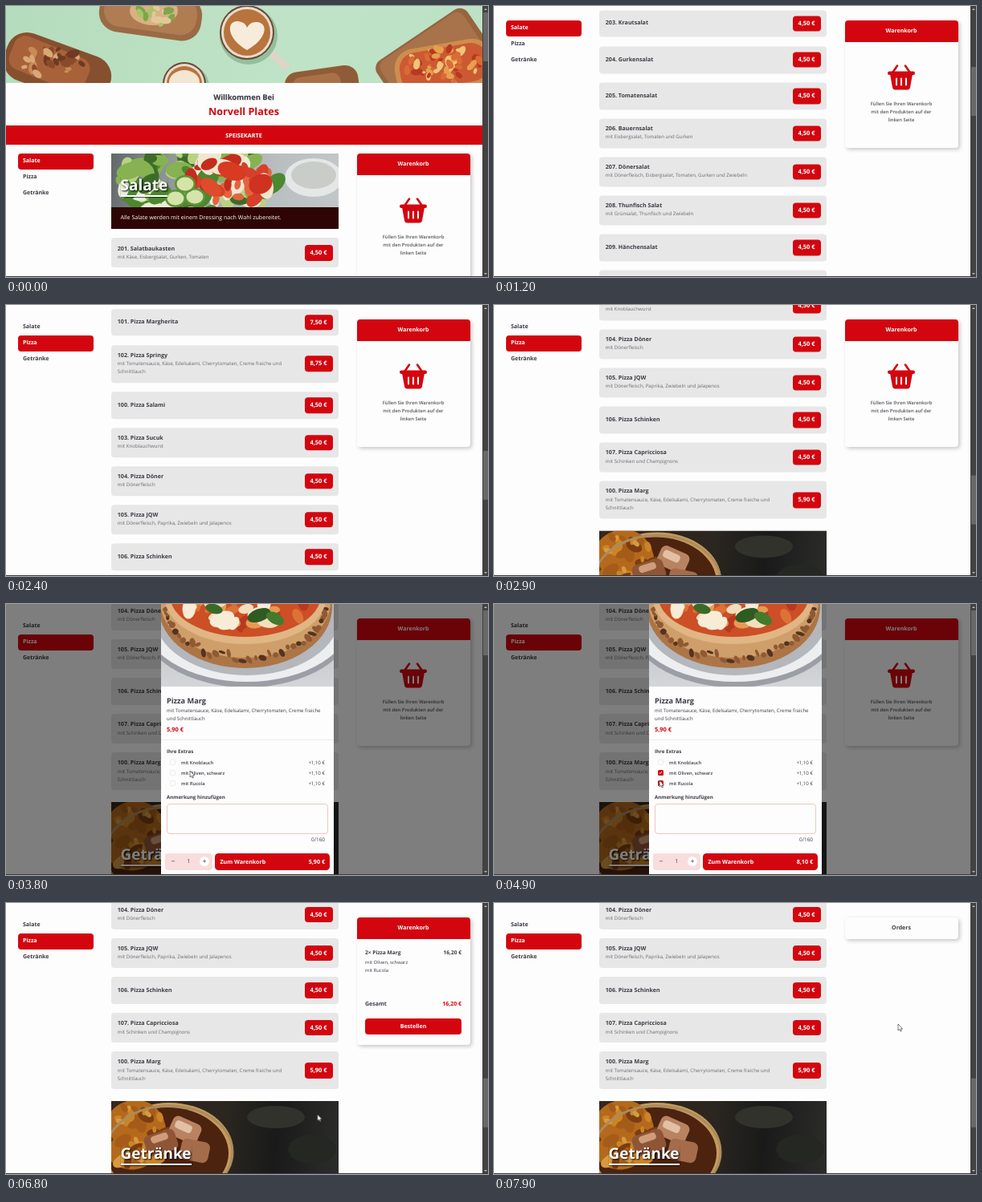
Animation, 600 px wide and 338 px high, one loop 8000 ms. Source, as an HTML page:

```html
<!DOCTYPE html>
<html lang="de">
<head>
<meta charset="utf-8">
<title>Speisekarte</title>
<style>
@property --t { syntax: '<number>'; inherits: true; initial-value: 0; }
@property --s { syntax: '<number>'; inherits: true; initial-value: 0; }

:root { --red: #d3060f; --ink: #3c3c46; }
html, body { margin: 0; width: 100%; height: 100%; overflow: hidden; background: #fdfdfd; }
* { box-sizing: border-box; }

/* --t counts ticks of 100 ms, --s is the scroll offset */
#stage {
  position: absolute; inset: 0 auto auto 0; width: 600px; height: 338px; overflow: hidden;
  background: #fdfdfd; color: var(--ink);
  font-family: "Open Sans", "Noto Sans", sans-serif; text-rendering: geometricPrecision;
  animation: tick 8s steps(80) -20ms infinite, scroll 8s -20ms infinite;
}
@keyframes tick { from { --t: 0; } to { --t: 80; } }
@keyframes scroll {
  0% { --s: 0; animation-timing-function: steps(3); }
  3.75% { --s: 30; animation-timing-function: steps(5); }
  10% { --s: 190; animation-timing-function: steps(4); }
  15% { --s: 377.6; animation-timing-function: steps(7); }
  23.75% { --s: 795.1; animation-timing-function: steps(10); }
  36.25% { --s: 1136.6; animation-timing-function: steps(3); }
  40%, 100% { --s: 1171; }
}
/* visible from tick --a until tick --b */
.at {
  --a: 0; --b: 80;
  opacity: min(clamp(0, var(--t) - var(--a) + 1, 1), clamp(0, var(--b) - var(--t), 1));
}

.abs, .l { position: absolute; }
.l { line-height: 10px; white-space: nowrap; }
.c { transform: translateX(-50%); }
.r { transform: translateX(-100%); }
.b { font-weight: 700; }
.red { color: var(--red); }
.white { color: #fff; }
.pic { position: absolute; left: 0; top: 0; display: block; overflow: hidden; }
.pic g { filter: blur(.6px); }

#page { position: absolute; left: 0; top: 0; width: 593px; transform: translateY(calc(var(--s) * -1px)); }
.bar { left: 0; top: 149.4px; width: 593px; height: 23.8px; background: var(--red); }
#menu { position: absolute; top: 169px; left: 131px; width: 283px; display: flow-root; }

.banner { position: relative; height: 94px; margin: 15px 0 11.4px; overflow: hidden; }
.banner h2 {
  position: absolute; left: 11.5px; top: 28.6px; margin: 0; padding-bottom: 3px;
  font-size: 19px; line-height: 20px; color: #fff; border-bottom: 2px solid #fff;
  text-shadow: 1px 1px 2px #000; box-shadow: 0 1px 1px rgba(0, 0, 0, .6);
}
.banner.plain h2 { top: 54.6px; }
.banner p {
  position: absolute; left: 0; right: 0; top: 67px; height: 27px; margin: 0; padding-left: 11.5px;
  font-size: 7.1px; line-height: 27.6px; color: #fff; background: #2e0404;
}
.item {
  display: flex; align-items: center; justify-content: space-between;
  min-height: 33.9px; margin-bottom: 11.25px; padding: 7.2px 7.5px 7.2px 7.8px;
  border-radius: 4px; background: #e7e7e7;
}
.item div { margin: .95px 0; }
.item b { display: block; font-size: 7.1px; line-height: 10.2px; }
.item p { margin: 0; font-size: 6.1px; line-height: 10.3px; color: #6b6b70; white-space: pre; }
.price {
  width: 35px; height: 19.5px; border-radius: 4px; background: var(--red); color: #fff;
  font: 700 7.5px/20px "Open Sans", "Noto Sans", sans-serif; text-align: center;
}

#nav, #cart { position: absolute; top: max(18.4px, 184.4px - var(--s) * 1px); }
#nav { left: 15px; font-size: 7px; font-weight: 700; }
#nav div { position: absolute; width: 94px; height: 19.6px; padding-left: 6px; line-height: 20.6px; border-radius: 4px; }
#nav .at { background: var(--red); color: #fff; }
#cart { left: 437px; }
.card { position: absolute; width: 140.5px; height: 158.2px; border-radius: 4px; background: #fdfdfd; box-shadow: 2px 2px 5px rgba(0, 0, 0, .22); }
.card .head { height: 26.7px; border-radius: 4px 4px 0 0; background: var(--red); }
.card svg { position: absolute; left: 53px; top: 55px; }
.order { left: 10px; top: 126px; width: 120px; height: 20px; border-radius: 4px; background: var(--red); }

#modal { position: absolute; inset: 0; opacity: min(clamp(0, (var(--t) - 33) / 3, 1), clamp(0, (67 - var(--t)) / 3, 1)); }
.shade { inset: 0 7px 0 0; background: rgba(0, 0, 0, .5); }
.sheet { left: 193px; top: 0; width: 215px; height: 338px; overflow: hidden; background: #fdfdfd; }
.line { left: 193px; top: 169px; width: 215px; height: 1px; background: #ececec; }
.note { left: 200px; top: 249px; width: 201px; height: 37.5px; border: 1px solid #f0c6bf; border-radius: 4px; }
.count { left: 198px; top: 311px; width: 59px; height: 20.5px; border-radius: 4px; background: #f9dcdc; }
.dot { width: 12px; height: 12px; border-radius: 50%; background: #fff; }
.buy { left: 260px; top: 311px; width: 143px; height: 20.5px; border-radius: 4.5px; background: var(--red); }
.box { left: 204px; width: 6.6px; height: 6.6px; border: .6px solid #f3e9e9; border-radius: 1.5px; }
.tick { border: 0; background: var(--red); }
.tick svg { display: block; }

#track { left: 592.5px; top: 0; width: 7.5px; height: 338px; background: #424242; }
.thumb { left: 1px; top: 8px; width: 6px; background: #686868; }
.arrow { left: 2px; border: solid transparent; border-width: 0 2px; }
.up { top: 3px; border-bottom: 2.5px solid #bbb; }
.down { bottom: 3px; border-top: 2.5px solid #bbb; }
.edge { left: 0; bottom: 0; width: 600px; height: 1px; background: #3a3a3a; }

#cursor { position: absolute; left: 0; top: 0; animation: point 8s -20ms infinite; }
#cursor svg { position: absolute; left: 0; top: 0; overflow: visible; }
@keyframes point {
  0%, 42.5% { transform: translate(240px, 250px); animation-timing-function: steps(3); }
  46.25%, 52.5% { transform: translate(229px, 208px); animation-timing-function: steps(4); }
  57.5%, 63.75% { transform: translate(206px, 220px); animation-timing-function: steps(5); }
  70%, 77.5% { transform: translate(247px, 320px); animation-timing-function: steps(2); }
  80%, 82.5% { transform: translate(330px, 320px); animation-timing-function: steps(6); }
  90%, 100% { transform: translate(503px, 151px); }
}
</style>
</head>
<body>
<div id="stage">
  <div id="page"></div>
  <div id="nav"></div>
  <div id="cart"></div>
  <div id="modal"></div>
  <div id="track" class="abs">
    <i class="abs arrow up"></i><i class="abs arrow down"></i>
    <i class="abs at" style="--b:35"><i class="abs thumb" style="height:61px;transform:translateY(calc(var(--s) * .18px))"></i></i>
    <i class="abs at" style="--a:35;--b:66"><i class="abs thumb" style="height:56px"></i></i>
    <i class="abs at" style="--a:66"><i class="abs thumb" style="height:61px;transform:translateY(calc(var(--s) * .18px))"></i></i>
  </div>
  <div class="abs edge"></div>
  <div class="at" style="--a:34">
    <div id="cursor">
      <div class="at" style="--a:34;--b:56"><svg width="6" height="10"><use href="#ptr"/></svg></div>
      <div class="at" style="--a:56;--b:66"><svg width="8" height="12"><path d="M-.6 1q.8-1 1.6 0v4l3.2.8q1 .3.8 1.5l-.7 4.2h-4.3l-2.800-4q0-1.400 2.200 0z" fill="#fff" stroke="#222" stroke-width=".7"/></svg></div>
      <div class="at" style="--a:66"><svg width="6" height="10"><path id="ptr" d="M0 0v8l1.900-1.600 1.200 2.700 1.300-.6-1.200-2.500h2.400z" fill="#fff" stroke="#222" stroke-width=".6"/></svg></div>
    </div>
  </div>
</div>

<script>
const $ = id => document.getElementById(id);
const label = (x, y, size, text, cls = '', style = '') =>
  `<span class="l ${cls}" style="left:${x}px;top:${y - 4.8}px;font-size:${size}px;${style}">${text}</span>`;
const during = (a, b, html) => `<div class="at" style="--a:${a};--b:${b}">${html}</div>`;

// soft pictures built from ellipses
let seed = 7;
const rnd = () => (seed = seed * 16807 % 2147483647) / 2147483647;
const oval = (x, y, rx, ry, fill, rot = 0) =>
  `<ellipse cx="${x}" cy="${y}" rx="${rx}" ry="${ry}" fill="${fill}" transform="rotate(${rot} ${x} ${y})"/>`;
const slab = (x, y, w, h, r, fill, rot = 0) =>
  `<rect x="${x - w / 2}" y="${y - h / 2}" width="${w}" height="${h}" rx="${r}" fill="${fill}" transform="rotate(${rot} ${x} ${y})"/>`;
const scatter = (n, x, y, rx, ry, size, fills) => Array.from({ length: n }, (_, i) => {
  const a = rnd() * 6.283, d = Math.sqrt(rnd()), s = size * (.5 + rnd());
  return oval(x + rx * d * Math.cos(a), y + ry * d * Math.sin(a), s, s * .6, fills[i % fills.length], rnd() * 180);
}).join('');
const pic = (w, h, bg, art) =>
  `<svg class="pic" width="${w}" height="${h}" style="background:${bg}"><g>${art}</g></svg>`;

const cup = (x, y, r) => oval(x + 2, y + 4, r + 2, r + 2, '#93bf9f') + oval(x, y, r, r, '#6b4a33')
  + oval(x, y, r - 2, r - 2, '#e6dccf') + oval(x, y, r - 5, r - 5, '#b8743c');

const hero = pic(593, 96, 'linear-gradient(100deg,#b5dcbd,#bfe3c6 60%,#bde1c4)',
  slab(64, 78, 136, 62, 26, '#86502f', 20) + slab(54, 72, 100, 44, 14, '#a8623a', 22)
  + scatter(30, 54, 72, 42, 20, 6, ['#6e3a22', '#c98a55', '#8a4a2c', '#d9a878'])
  + slab(180, 10, 128, 56, 24, '#9a6a45', 8) + slab(180, 8, 116, 46, 20, '#b07c52', 8)
  + oval(184, 6, 30, 18, '#d9b183') + scatter(18, 184, 12, 26, 10, 5, ['#7fa64a', '#a9c468', '#e3c79a'])
  + slab(338, 66, 36, 9, 4, '#dfd5c6', 42) + cup(300, 33, 34)
  + '<path d="M300 55C274 40 274 18 289 19q9 1 11 8 4-8 13-7c14 2 12 21-13 35z" fill="#f7ecdc"/>'
  + cup(222, 97, 27) + oval(222, 95, 19, 15, '#f3e6d2')
  + slab(394, 104, 92, 52, 16, '#8f5c37', -8) + slab(388, 106, 60, 40, 10, '#a97146', -8)
  + slab(532, 66, 136, 72, 12, '#976440', -34) + slab(530, 64, 124, 62, 10, '#a8724a', -34)
  + slab(545, 76, 122, 58, 24, '#cf8d4d', -10) + slab(545, 76, 110, 48, 20, '#cb5a33', -10)
  + scatter(60, 545, 76, 52, 23, 5, ['#e6a04e', '#b9381f', '#efc476', '#da6b36']));

const salad = pic(283, 94, 'linear-gradient(100deg,#62686a,#8f9698 25%,#b9bfc0 70%,#c3c7c9)',
  oval(252, 30, 36, 24, '#e4e7e6') + oval(252, 27, 28, 17, '#c9cdca')
  + scatter(90, 112, 34, 100, 46, 12, ['#4d8730', '#86b251', '#3c6d28', '#b9d184', '#e9efd8'])
  + scatter(34, 142, 34, 56, 30, 12, ['#d6402a', '#e4633f', '#c42d1c', '#f0e6d0'])
  + oval(150, 22, 18, 11, '#d83a22', 20) + oval(186, 38, 15, 12, '#cf3220', -25) + oval(124, 42, 15, 9, '#de4c2b', 40)
  + [[80, 56], [104, 54], [92, 38]].map(([x, y]) => oval(x, y, 13, 11, '#5d9439') + oval(x, y, 10.5, 8.5, '#d5e4a8')).join(''));

const sandwich = pic(283, 94, 'linear-gradient(95deg,#a5642c,#cf9347 25%,#b9752f 70%,#dba057)',
  oval(114, 34, 100, 38, '#d9a263', 4) + oval(100, 14, 86, 24, '#ecc68c', 5)
  + scatter(46, 116, 20, 80, 13, 10, ['#7a4523', '#b97b43', '#5f3219', '#d6a067'])
  + scatter(40, 132, 58, 92, 12, 11, ['#3d8a2a', '#79b843', '#a8cf63'])
  + scatter(22, 116, 42, 72, 8, 9, ['#d3281a', '#b51d13', '#e5562f'])
  + oval(120, 76, 104, 12, '#e3b678'));

const drink = pic(283, 94, 'linear-gradient(95deg,#38261a,#2a2620 50%,#191a19 72%,#2c2d2b)',
  oval(205, 20, 36, 14, '#32322c') + oval(250, 60, 30, 18, '#252723')
  + oval(72, 62, 80, 60, '#c79a5a') + oval(70, 65, 76, 57, '#4b230f') + oval(28, 42, 40, 44, '#b5691c', 20)
  + scatter(50, 30, 44, 42, 40, 8, ['#cc8426', '#a55c18', '#7a3d12', '#d79a40'])
  + slab(92, 36, 38, 26, 7, '#b98362', 24) + slab(62, 52, 40, 27, 7, '#8f5537', -18) + slab(104, 62, 36, 26, 7, '#a46c4b', 12)
  + slab(90, 32, 22, 10, 4, '#e2c0a4', 24) + slab(60, 46, 22, 9, 4, '#cf9d7b', -18)
  + '<ellipse cx="72" cy="64" rx="79" ry="58" fill="none" stroke="#a98c60" stroke-width="3"/>');

const chars = Array.from({ length: 36 }, (_, i) => {
  const a = .08 + i * .085;
  return oval(105 + 100 * Math.cos(a), 1 + (60 + rnd() * 12) * Math.sin(a), 2 + rnd() * 4, 1.5 + rnd() * 2.5, i % 3 ? '#8f5a33' : '#54331f', rnd() * 90);
}).join('');
const pizza = pic(215, 103, 'linear-gradient(#b9bcc1,#c9ccd0 60%,#d3d5d8)',
  oval(107, 20, 134, 84, '#9b9fa5') + oval(107, 15, 132, 82, '#eceef0') + oval(107, 13, 116, 76, '#b4b7bc')
  + oval(105, 4, 108, 76, '#ad7546') + oval(105, -3, 106, 70, '#cf9f6b') + chars
  + oval(105, -7, 100, 57, '#e0b684') + oval(105, -11, 94, 52, '#cc4f26')
  + scatter(40, 105, -8, 82, 42, 9, ['#dd7236', '#b9391f', '#e69a54'])
  + scatter(14, 100, 2, 72, 26, 11, ['#f3dfbc', '#f8ecd6'])
  + oval(122, 14, 15, 8, '#2f5a22', -20) + oval(142, 18, 12, 7, '#447a2d', 30) + oval(66, 6, 11, 6, '#3b6a28', 15));

// menu
const banner = (title, art, text) =>
  `<div class="banner ${text ? '' : 'plain'}">${art}<h2>${title}</h2>${text ? `<p>${text}</p>` : ''}</div>`;
const item = row => {
  const [title, price, desc] = row.split('|');
  return `<div class="item"><div><b>${title}</b>${desc ? `<p>${desc}</p>` : ''}</div><span class="price">${price || '4,50'} €</span></div>`;
};
const creme = 'mit Tomatensauce, Käse, Edelsalami, Cherrytomaten, Creme fraiche';
const salads = [
  '201. Salatbaukasten||mit Käse, Eisbergsalat, Gurken, Tomaten',
  '202. Bohnensalat', '203. Krautsalat', '204. Gurkensalat', '205. Tomatensalat',
  '206. Bauernsalat||mit Eisbergsalat, Tomaten und Gurken',
  '207. Dönersalat||mit Dönerfleisch, Eisbergsalat, Tomaten, Gurken und Zwiebeln',
  '208. Thunfisch Salat||mit Grünsalat, Thunfisch und Zwiebeln',
  '209. Hänchensalat',
  '210. Hirtensalat||mit Eisbergsalat, Tomaten und Oliven',
  '211. Käsesalat||mit Käse, Gurken und Tomaten',
  '251. Salatbaukasten2||Norwegian salmon fillet fried on the skin with garnish and sauce of your\nchoice'
];
const pizzas = [
  '101. Pizza Margherita|7,50',
  `102. Pizza Springy|8,75|${creme} und\nSchnittlauch`,
  '100. Pizza Salami',
  '103. Pizza Sucuk||mit Knoblauchwurst',
  '104. Pizza Döner||mit Dönerfleisch',
  '105. Pizza JQW||mit Dönerfleisch, Paprika, Zwiebeln und Jalapenos',
  '106. Pizza Schinken',
  '107. Pizza Capricciosa||mit Schinken und Champignons',
  `100. Pizza Marg|5,90|${creme} und\nSchnittlauch`
];
$('page').innerHTML = hero
  + label(296, 114, 9.3, 'Willkommen Bei', 'b c', 'text-shadow:.5px .5px 1px #ccc')
  + label(296, 132, 12.6, 'Norvell Plates', 'b c red')
  + '<div class="abs bar"></div>' + label(296, 161.4, 7.2, 'SPEISEKARTE', 'b c white')
  + '<div id="menu">'
  + banner('Salate', salad, 'Alle Salate werden mit einem Dressing nach Wahl zubereitet.') + salads.map(item).join('')
  + banner('Pizza', sandwich, 'mit Tomatensauce, Käse und Oregano zubereitet.') + pizzas.map(item).join('')
  + banner('Getränke', drink) + '</div>';

const tab = (name, i, attrs = '', time = '') => `<div ${attrs} style="top:${i * 19.8}px;${time}">${name}</div>`;
$('nav').innerHTML = ['Salate', 'Pizza', 'Getränke'].map((n, i) => tab(n, i)).join('')
  + tab('Salate', 0, 'class="at"', '--b:20') + tab('Pizza', 1, 'class="at"', '--a:20');

// cart
const basket = `<svg width="34" height="32" fill="#d3060f">
  <path d="M3 12h28l-3 16.500q-.5 3-3.500 3h-15q-3 0-3.500-3z"/><rect y="8.500" width="34" height="4.400" rx="2.200"/>
  <path d="M6.500 9.500l5.500-8M27.500 9.500l-5.500-8" stroke="#d3060f" stroke-width="2.600" stroke-linecap="round"/>
  <path d="M11 17.500v8M17 17.500v8M23 17.500v8" stroke="#fdfdfd" stroke-width="2" stroke-linecap="round"/></svg>`;
const head = '<div class="head"></div>' + label(70, 13.4, 7, 'Warenkorb', 'b c white');
const hint = ['Füllen Sie Ihren Warenkorb', 'mit den Produkten auf der', 'linken Seite']
  .map((s, i) => label(70, 103 + i * 10, 5.9, s, 'c', 'font-weight:600;color:#55555c')).join('');
$('cart').innerHTML =
  during(0, 66, `<div class="card">${head}${basket}${hint}</div>`)
  + during(66, 76, `<div class="card">${head}`
    + label(10, 43, 6.6, '2× Pizza Marg', 'b') + label(130, 43, 6.6, '16,20 €', 'b r')
    + label(10, 55, 5.9, 'mit Oliven, schwarz') + label(10, 65, 5.9, 'mit Rucola')
    + label(10, 108, 7, 'Gesamt', 'b') + label(130, 108, 7, '16,20 €', 'b r red')
    + '<div class="abs order"></div>' + label(70, 136, 7, 'Bestellen', 'b c white') + '</div>')
  + during(76, 80, `<div class="card" style="height:27px">${label(70, 13.4, 7, 'Orders', 'b c')}</div>`);

// dialog
const extra = (name, y, from) =>
  `<div class="abs box" style="top:${y - 3.3}px"></div>`
  + (from ? `<div class="abs box tick at" style="top:${y - 3.3}px;--a:${from}"><svg width="6.6" height="6.6"><path d="M1.7 3.4l1.2 1.2 2.2-2.6" fill="none" stroke="#fff" stroke-width=".9"/></svg></div>` : '')
  + label(218, y, 5.75, name, '', 'font-weight:600') + label(397, y, 6.1, '+1,10 €', 'r');
const total = [['5,90', 0, 41], ['7,00', 41, 49], ['8,10', 49, 59], ['16,20', 59, 80]]
  .map(([p, a, b]) => during(a, b, label(397, 321.5, 7.2, p + ' €', 'b r white'))).join('');
const dot = x => `<div class="abs dot" style="left:${x - 6}px;top:315.2px"></div>`;
$('modal').innerHTML = `<div class="abs shade"></div><div class="abs sheet">${pizza}</div>`
  + label(200, 120.5, 9.2, 'Pizza Marg', 'b')
  + label(200, 132.5, 6.1, creme) + label(200, 142.5, 6.1, 'und Schnittlauch')
  + label(200, 156.5, 7.4, '5,90 €', 'b red') + '<div class="abs line"></div>'
  + label(200, 183.5, 6.2, 'Ihre Extras', 'b')
  + extra('mit Knoblauch', 197.5) + extra('mit Oliven, schwarz', 210.5, 41) + extra('mit Rucola', 223.5, 49)
  + label(200, 240.5, 6.2, 'Anmerkung hinzufügen', 'b') + '<div class="abs note"></div>'
  + label(397, 293.5, 6.4, '0/160', 'r')
  + '<div class="abs count"></div>' + dot(247) + during(59, 80, dot(208))
  + label(208, 321, 9, '−', 'c') + label(247, 321, 9, '+', 'c')
  + during(0, 59, label(227.5, 321.5, 7, '1', 'c')) + during(59, 80, label(227.5, 321.5, 7, '2', 'c red'))
  + '<div class="abs buy"></div>' + label(266.5, 321.5, 7.07, 'Zum Warenkorb', 'b white') + total;
</script>
</body>
</html>
```
